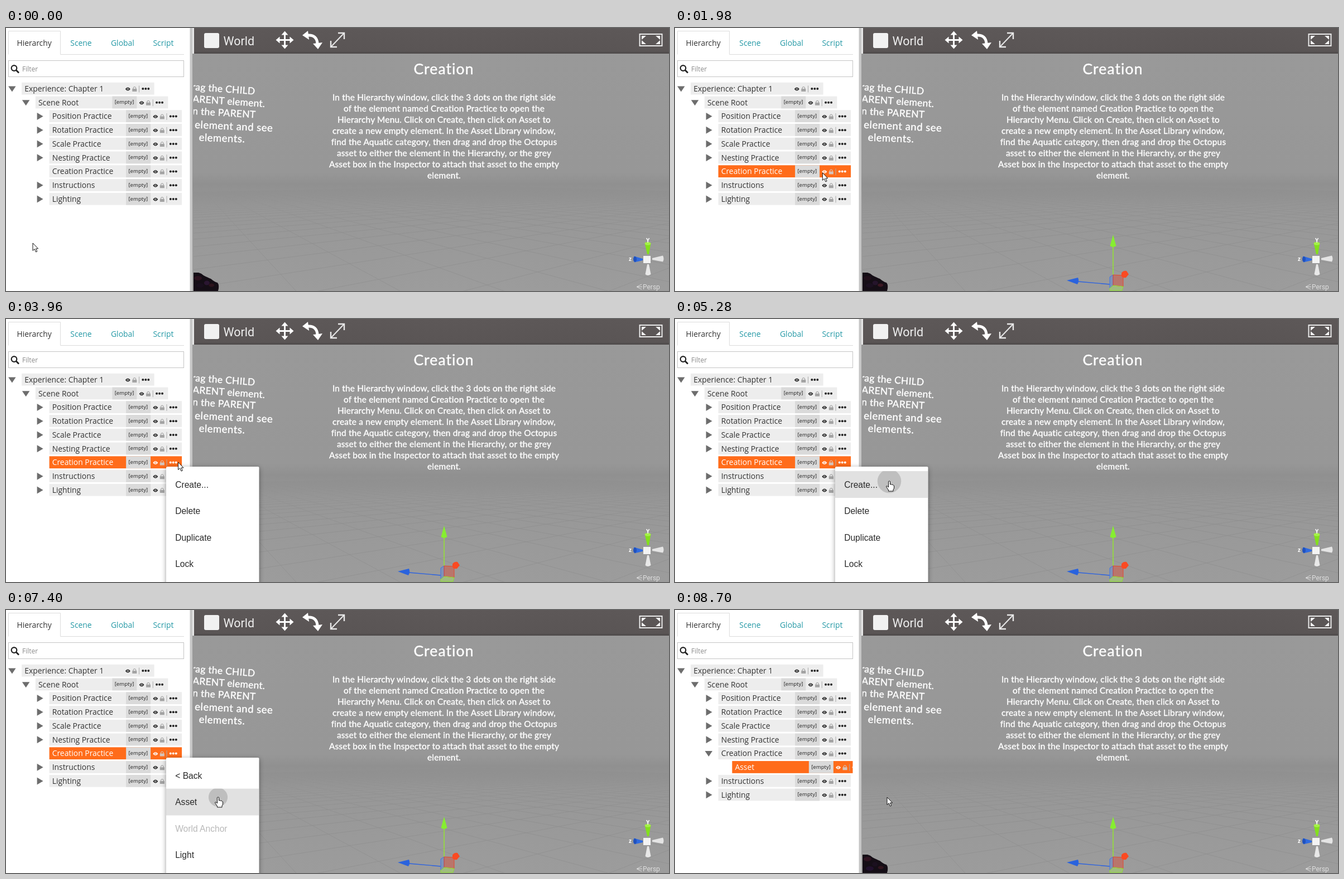
An HTML page that plays this animation: 1188 px wide and 472 px high, repeating every 8750 ms.

```html
<!DOCTYPE html>
<html lang="en">
<head>
<meta charset="utf-8">
<title>Creating an asset</title>
<style>
  html, body { margin: 0; width: 100%; height: 100%; overflow: hidden; background: #fff; }
  svg { display: block; width: 100%; height: 100%; }
  text { font: 13.9px "Open Sans", sans-serif; fill: #333; white-space: pre; }
  .tab { fill: #2398a5; }
  .bg { fill: #ededed; }
  .slot { fill: #dadada; }
  .row .tag { font-size: 9.6px; fill: #222; }
  .ink { fill: #222; }
  .lock { fill: #a3a3a3; stroke: #a3a3a3; }
  .on .bg { fill: #ff6c1a; }
  .on .name, .on .ink { fill: #fff; }
  .on .lock { fill: #d5c3ba; stroke: #d5c3ba; }
  .menu text { font: 15.6px "Liberation Sans", Arial, sans-serif; fill: #2b2b2b; }
  .menu .off { fill: #b9b9b9; }
  .sign text { font: 15.4px Lato, sans-serif; letter-spacing: .2px; fill: #fff; stroke: #fff; stroke-width: .4; }
  .sign .title { font-size: 26.5px; letter-spacing: 1.1px; }
  .sign .side { font-size: 18.5px; letter-spacing: .5px; }
  .sign .caps { font-size: 17.4px; letter-spacing: .3px; }
  .tip text { font-size: 11.6px; font-weight: 600; fill: #fff; }
</style>
</head>
<body>
<script>
const NS = 'http://www.w3.org/2000/svg';
function el(tag, attrs, parent, text) {
  const n = document.createElementNS(NS, tag);
  for (const k in attrs) n.setAttribute(k, attrs[k]);
  if (text) n.textContent = text;
  if (parent) parent.appendChild(n);
  return n;
}
const rect = (p, x, y, width, height, fill, more) => el('rect', { x, y, width, height, ...(fill && { fill }), ...more }, p);
const path = (p, d, fill, more) => el('path', { d, ...(fill && { fill }), ...more }, p);
const line = (p, d, stroke, w, more) => path(p, d, 'none', { stroke, 'stroke-width': w, ...more });
const label = (p, x, y, text, more) => el('text', { x, y, ...more }, p, text);
const group = (p, more) => el('g', more, p);
const show = (n, on) => n.setAttribute('visibility', on ? 'visible' : 'hidden');
const clamp = v => Math.max(0, Math.min(1, v));

const svg = el('svg', { viewBox: '0 0 1188 472', preserveAspectRatio: 'none' }, document.body);
const defs = el('defs', {}, svg);
function gradient(id, y1, y2, stops) {
  const g = el('linearGradient', { id, gradientUnits: 'userSpaceOnUse', x1: 0, x2: 0, y1, y2 }, defs);
  stops.forEach(([offset, color]) => el('stop', { offset, 'stop-color': color }, g));
}
function clip(id, x, y, w, h) {
  return rect(el('clipPath', { id }, defs), x, y, w, h);
}
gradient('sky', 46, 472, [[0, '#999'], [.5, '#979797'], [.55, '#909090'], [.64, '#979797'], [1, '#9c9c9c']]);
gradient('fade', 276, 360, [[0, '#000'], [.25, '#555'], [1, '#fff']]);
gradient('bar', 0, 46, [[0, '#5d5858'], [.9, '#5a5555'], [1, '#4c4848']]);
rect(el('mask', { id: 'haze', maskUnits: 'userSpaceOnUse', x: 334, y: 270, width: 854, height: 202 }, defs), 334, 270, 854, 202, 'url(#fade)');
clip('panelClip', 0, 0, 318.5, 472);
clip('sceneClip', 336, 46, 852, 426);
const itemClip = clip('itemClip', 287, 273, 166, 48);

/* 3D view */
rect(svg, 334, 46, 854, 426, 'url(#sky)');
const scene = group(svg, { 'clip-path': 'url(#sceneClip)' });

function floorGrid() {
  const yaw = .62, c = Math.cos(yaw), s = Math.sin(yaw), cell = .75, far = 30, near = 1.5;
  const view = (a, b) => [a * c - b * s, a * s + b * c];
  const put = ([x, z]) => (762 + 600 * x / z).toFixed(1) + ' ' + (270 + 600 / z).toFixed(1);
  const cut = (p, q) => {
    const k = (near - p[1]) / (q[1] - p[1]);
    return [p[0] + (q[0] - p[0]) * k, near];
  };
  let d = '';
  for (let i = -40; i <= 40; i++) {
    for (const swap of [false, true]) {
      const v = i * cell;
      let p = swap ? view(v, -far) : view(-far, v), q = swap ? view(v, far) : view(far, v);
      if (p[1] < near && q[1] < near) continue;
      if (p[1] < near) p = cut(p, q); else if (q[1] < near) q = cut(q, p);
      d += 'M' + put(p) + 'L' + put(q);
    }
  }
  line(scene, d, '#868686', .8, { mask: 'url(#haze)', opacity: .5 });
}
floorGrid();

const sign = group(scene, { class: 'sign' });
label(sign, 784.5, 83, 'Creation', { class: 'title', 'text-anchor': 'middle' });
[
  'In the Hierarchy window, click the 3 dots on the right side',
  'of the element named Creation Practice to open the',
  'Hierarchy Menu. Click on Create, then click on Asset to',
  'create a new empty element. In the Asset Library window,',
  'find the Aquatic category, then drag and drop the Octopus',
  'asset to either the element in the Hierarchy, or the grey',
  'Asset box in the Inspector to attach that asset to the empty',
  'element.'
].forEach((s, i) => label(sign, 785, 129.5 + i * 20.1, s, { 'text-anchor': 'middle' }));
[
  ['Drag the CHILD', 446, 119.5, 4.2, 'side caps'], ['the PARENT element.', 464, 142, 4, 'side caps'],
  ['on the PARENT', 447, 161.5, 3.4, 'side caps'], ['element and see', 478, 186, 2.6, 'side'], ['elements.', 428, 205.5, 2, 'side']
].forEach(([s, x, y, r, cls]) => label(sign, 0, 0, s, { class: cls, 'text-anchor': 'end', transform: `translate(${x} ${y}) rotate(${r})` }));

const creature = group(scene);
path(creature, 'M336 439H345Q350 440 354 444Q362 448 367 450Q374 456 379 457Q383 462 380 472H336Z', '#150e16');
const sheen = [['#3c1726', 344, 448, 7, 4], ['#2c1734', 359, 457, 5, 4], ['#431b25', 369, 462, 5, 3], ['#231230', 348, 463, 7, 4]]
  .map(([fill, cx, cy, rx, ry]) => el('ellipse', { cx, cy, rx, ry, fill }, creature));

const handles = group(scene);
line(handles, 'M785 445V392', '#93f01f', 1.3);
path(handles, 'M785 371L790.500 391Q785 395 779.500 391Z', '#86ee30');
line(handles, 'M779 460L722 455', '#2b62e0', 1.3);
path(handles, 'M702 453L722 448Q725 454 721 460Z', '#2a63dd');
path(handles, 'M779 447L785 443V462L779 467Z', '#5b87dc', { 'fill-opacity': .45, stroke: '#3f74e6' });
path(handles, 'M785 443L803 444V464L785 462Z', '#d8503c', { 'fill-opacity': .5, stroke: '#e3492e' });
path(handles, 'M779 467L785 462L803 464L801 471H779Z', '#a3dc62', { 'fill-opacity': .5, stroke: '#8fe32f' });
path(handles, 'M800 440Q803 435 809 436L813 442L808 448Q802 449 800 445Z', '#fb4a22');

// orientation widget
path(scene, 'M1144.500 386Q1150 382 1155.500 386L1152 406H1149Z', '#83e01d');
el('ellipse', { cx: 1150, cy: 387, rx: 5.5, ry: 2.8, fill: '#a5f04a' }, scene);
path(scene, 'M1125 409.500L1141 414V417L1126 420.500Z', '#2f6ae0');
el('ellipse', { cx: 1127, cy: 415, rx: 3, ry: 5, fill: '#2052bd' }, scene);
path(scene, 'M1158 413L1177 408.500Q1180 414 1177 419.500L1158 416Z', '#e4e4e4');
path(scene, 'M1149 424H1152L1155.500 442Q1150 446 1145.500 442Z', '#e8e8e8');
rect(scene, 1142, 409, 13, 13, '#f3f3f3');
const mark = { 'text-anchor': 'middle', style: 'font-size:10px;font-weight:700;fill:#fff' };
label(scene, 1150, 385, 'Y', mark);
label(scene, 1118.5, 418, 'z', mark);
label(scene, 1141, 469, 'Persp', { style: 'font:12px Roboto,sans-serif;fill:#dedede' });
line(scene, 'M1139 460L1130 464.500L1139 469M1131 464.500H1140', '#dedede', 1);

/* toolbar */
const bar = group(svg);
rect(bar, 337, 0, 851, 46, 'url(#bar)');
rect(bar, 355, 9, 27, 27, '#f1f1f1', { rx: 3 });
label(bar, 389.5, 30.5, 'World', { style: 'font:21.5px Roboto,sans-serif;fill:#eee' });
const moveIcon = group(bar, { transform: 'translate(499.500 21.500)' });
for (let a = 0; a < 360; a += 90) {
  path(moveIcon, 'M-1.500 0V-9H-6L0-16L6-9H1.500V0Z', '#fff', { transform: `rotate(${a})` });
}
line(bar, 'M541 13Q557 12 558 28', '#fff', 5);
path(bar, 'M531 13L541 5L543 21ZM559 38L550 28L567 26Z', '#fff');
line(bar, 'M583 33L605 10', '#e8e8e8', 2);
line(bar, 'M595 9H606V20M582 23V34H593', '#e8e8e8', 2.4);
rect(bar, 1135.5, 11, 40, 21, 'none', { stroke: '#e9e9e9', 'stroke-width': 2 });
path(bar, 'M1139 14H1147L1139 21ZM1172 14H1164L1172 21ZM1139 29H1147L1139 22ZM1172 29H1164L1172 22Z', '#f2f2f2');

/* left panel */
const panel = group(svg);
rect(panel, 329.5, 0, 4.5, 472, '#c6c6c6');
rect(panel, 334, 0, 3, 46, '#e6e6e6');
line(panel, 'M4.500 47.500V5.500H97.500V47.500H319', '#dcdcdc', 1);
label(panel, 19.5, 31.5, 'Hierarchy');
[['Scene', 115.3], ['Global', 188], ['Script', 263.5]].forEach(([s, x]) => label(panel, x, 31.5, s, { class: 'tab' }));
rect(panel, 4.5, 58.5, 314, 29, '#fff', { stroke: '#c4c4c4' });
el('circle', { cx: 14.5, cy: 72, r: 4.8, fill: 'none', stroke: '#222', 'stroke-width': 2.2 }, panel);
line(panel, 'M18 75.500L23 80.500', '#222', 2.8);
label(panel, 29, 78, 'Filter', { style: 'font-size:12px;fill:#8a8a8a' });

const PITCH = 24.75, tree = group(panel, { 'clip-path': 'url(#panelClip)' });
function makeRow(name, level, empty = true) {
  const g = group(tree, { class: 'row' }), x = 28.1 + level * PITCH;
  rect(g, x, -11.2, 237.5, 21.8, null, { class: 'bg' });
  label(g, x + 5.1, 4.8, name, { class: 'name' });
  if (empty) {
    rect(g, x + 137.5, -11.2, 44, 21.8, null, { class: 'slot' });
    label(g, x + 159.2, 2.6, '[empty]', { class: 'tag', 'text-anchor': 'middle' });
  }
  const icons = group(g, { transform: `translate(${x + .2} .500)` });
  path(icons, 'M185.500 0Q190-6 194.500 0Q190 6 185.500 0Z', null, { class: 'ink' });
  el('circle', { cx: 190, cy: 0, r: 1.8, class: 'bg' }, icons);
  el('circle', { cx: 190, cy: 0, r: 1, class: 'ink' }, icons);
  rect(icons, 198, -.5, 8, 5, null, { class: 'lock', 'stroke-width': 0 });
  path(icons, 'M199.700 0V-2Q202-6 204.300-2V0', null, { class: 'lock', 'stroke-width': 1.2, 'fill-opacity': 0 });
  rect(icons, 209.7, -6, 1, 12, '#aaa');
  for (const cx of [217, 222, 227]) el('circle', { cx, cy: -.5, r: 2, class: 'ink' }, icons);
  const closed = path(g, `M${x - 22} -6.500V6.500L${x - 11} 0Z`, '#6d6d6d');
  const open = path(g, `M${x - 24} -4.500H${x - 10.5}L${x - 17.2} 5.500Z`, '#6d6d6d');
  return {
    g,
    place(i) { g.setAttribute('transform', `translate(0 ${109 + i * PITCH})`); },
    arrow(state) { show(closed, state === 'closed'); show(open, state === 'open'); }
  };
}
const rows = [
  makeRow('Experience: Chapter 1', 0, false), makeRow('Scene Root', 1),
  ...['Position', 'Rotation', 'Scale', 'Nesting', 'Creation'].map(s => makeRow(s + ' Practice', 2)),
  makeRow('Instructions', 2), makeRow('Lighting', 2)
];
rows.forEach((r, i) => { r.place(i); r.arrow(i < 2 ? 'open' : 'closed'); });
const creation = rows[6], asset = makeRow('Asset', 3);
asset.place(7);
asset.arrow('none');

const tip = group(svg, { class: 'tip' });
path(tip, 'M81 201H212Q215 201 215 204V231Q215 234 212 234H154L146.500 241.500L139 234H81Q78 234 78 231V204Q78 201 81 201Z', '#222', { stroke: '#222' });
label(tip, 146.3, 222, 'Creation Practice', { 'text-anchor': 'middle' });

/* context menu */
const menu = group(svg, { class: 'menu' });
rect(menu, 287, 265, 166.5, 220, '#fff', { rx: 2, style: 'filter:drop-shadow(0 2px 4px rgba(0,0,0,.4))' });
const hover = rect(menu, 287, 273, 166, 48, '#e1e1e1');
const ripple = el('circle', { fill: '#000', 'clip-path': 'url(#itemClip)' }, menu);
const [mainItems, createItems] = [['Create...', 'Delete', 'Duplicate', 'Lock'], ['< Back', 'Asset', 'World Anchor', 'Light']].map(list => {
  const g = group(menu);
  list.forEach((s, i) => label(g, 303.2, 302.5 + i * 47.6, s, { class: s === 'World Anchor' ? 'off' : '' }));
  return g;
});

/* pointers */
const outline = { stroke: '#111', 'stroke-width': 1, 'stroke-linejoin': 'round' };
const cursors = {
  arrow: path(svg, 'M0 0V13.500L3.200 10.700L5.500 16L7.800 15L5.500 10H9.600Z', '#fff', outline),
  move: path(svg, 'M0-8.500L3-5H1V-1H5V-3L8.500 0L5 3V1H1V5H3L0 8.500L-3 5H-1V1H-5V3L-8.500 0L-5-3V-1H-1V-5H-3Z', '#fff', outline),
  hand: path(svg, 'M-1.500 .500Q0-1 1.500 .500V6L3 5.500L4.500 6.500L6 6L7.300 7.500L8.500 8V13L7 15V18H-1.500V16L-5.500 10Q-5.500 8-3.500 9L-1.500 11Z', '#fff', outline)
};
const track = [
  [0, 48, 386], [120, 48, 386], [660, 187, 265], [1500, 187, 265], [2300, 306, 257], [2900, 306, 257], [3300, 308.5, 257],
  [3960, 308.5, 257], [4300, 384, 291], [6459, 384, 291], [6460, 384, 309], [6800, 380, 336], [8750, 380, 336]
];
function pointer(t) {
  const i = track.findIndex(k => k[0] > t), [t0, x0, y0] = track[i - 1], [t1, x1, y1] = track[i];
  const u = (t - t0) / (t1 - t0), e = u * u * (3 - 2 * u);
  return [x0 + (x1 - x0) * e, y0 + (y1 - y0) * e];
}

const SELECT = 1000, MENU_IN = 3050, CLICKS = [5230, 7360], MENU_OUT = 7470, ADDED = 7540, ASSET_ON = 8250;

function draw(t) {
  const [x, y] = pointer(t);
  const menuOn = t >= MENU_IN && t < MENU_OUT + 130, added = t >= ADDED;
  const overLabel = x > 78 && x < 215 && y > 98 && y < 318;

  creation.g.setAttribute('class', t >= SELECT && t < ASSET_ON ? 'row on' : 'row');
  creation.g.setAttribute('opacity', t >= 720 && t < SELECT ? .55 : 1);
  creation.arrow(added ? 'open' : 'none');
  asset.g.setAttribute('class', t >= ASSET_ON ? 'row on' : 'row');
  show(asset.g, added);
  rows[7].place(added ? 8 : 7);
  rows[8].place(added ? 9 : 8);
  show(handles, t >= SELECT);
  tip.setAttribute('opacity', overLabel ? clamp((t - 640) / 100) : 0);

  show(menu, menuOn);
  const grow = clamp((t - MENU_IN) / 200), s = .8 + .2 * (1 - (1 - grow) ** 3);
  menu.setAttribute('opacity', menuOn ? grow * (1 - clamp((t - MENU_OUT) / 130)) : 0);
  menu.setAttribute('transform', `translate(287 265) scale(${s}) translate(-287 -265)`);
  const overMenu = menuOn && x > 287 && x < 453 && y > 265;
  const top = y < 321 ? 273 : 320.6;
  hover.setAttribute('y', top);
  hover.setAttribute('opacity', overMenu && y > 273 ? 1 : 0);
  itemClip.setAttribute('y', top);
  const click = CLICKS.find(c => t >= c && t < c + 240), p = click ? (t - click) / 240 : 0;
  ripple.setAttribute('cx', x);
  ripple.setAttribute('cy', y);
  ripple.setAttribute('r', 100 * p);
  ripple.setAttribute('opacity', click ? .16 * (1 - p * p) : 0);
  mainItems.setAttribute('display', t < 5320 ? 'inline' : 'none');
  createItems.setAttribute('display', t < 5320 ? 'none' : 'inline');

  sheen.forEach((e, i) => {
    e.setAttribute('transform', `translate(${Math.sin(t / 260 + i * 2)} ${Math.cos(t / 310 + i)})`);
    e.setAttribute('opacity', .6 + .3 * Math.sin(t / 400 + i * 1.7));
  });

  const kind = overMenu ? 'hand' : overLabel ? 'move' : 'arrow';
  for (const k in cursors) {
    show(cursors[k], k === kind);
    cursors[k].setAttribute('transform', `translate(${x} ${y})`);
  }
}

const start = performance.now();
function tick() {
  draw((performance.now() - start) % 8750);
  requestAnimationFrame(tick);
}
tick();
</script>
</body>
</html>
```
